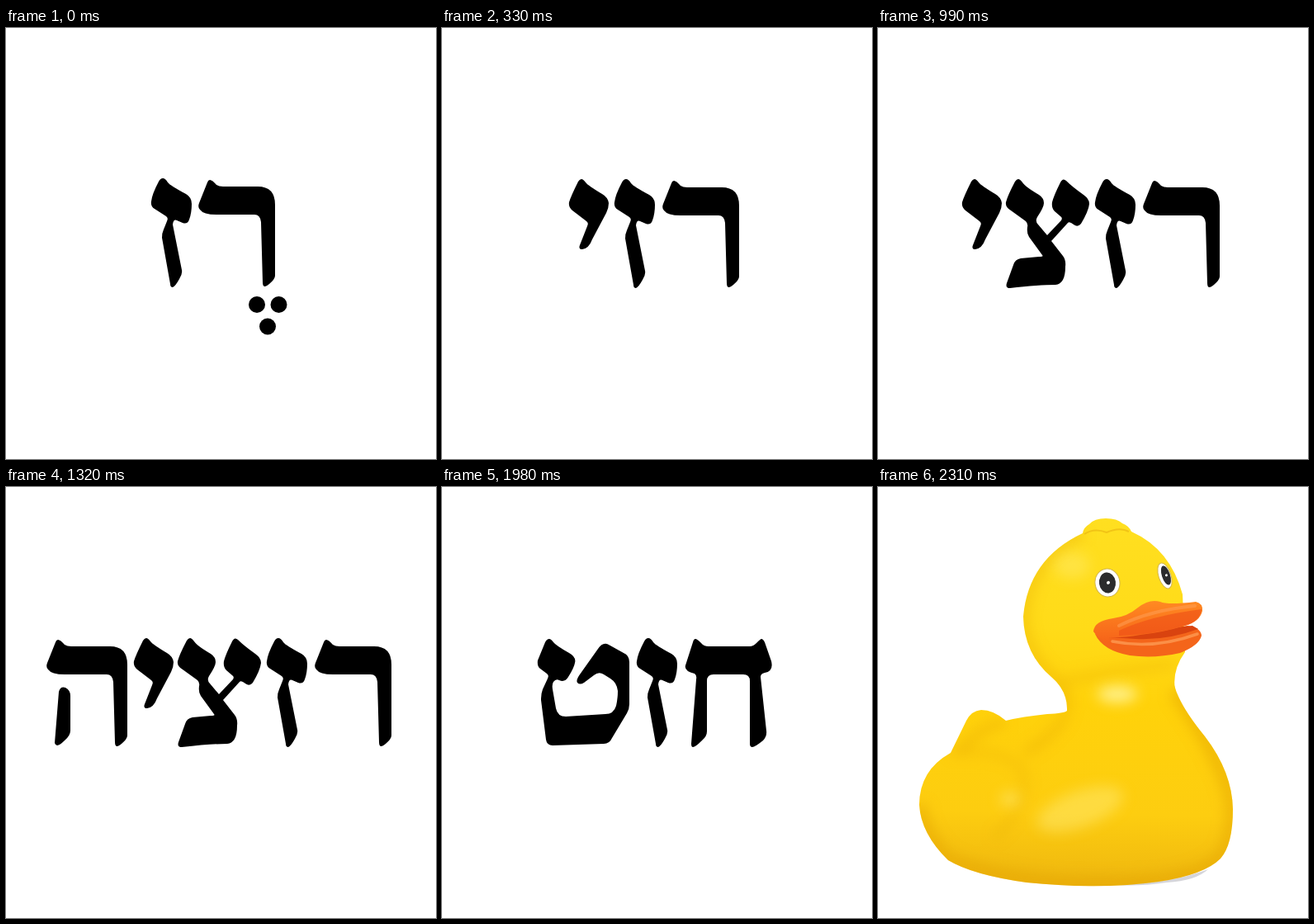
Write an HTML page that moves like this. It is 521 px wide and 522 px high and loops after 2.61 s.

```html
<!DOCTYPE html>
<html lang="he">
<head>
<meta charset="utf-8">
<style>
html, body { margin: 0; width: 100%; height: 100%; overflow: hidden; background: #fff; }
svg { display: block; width: 100%; height: 100%; }
.scene { visibility: hidden; }
.scene.on { visibility: visible; }
</style>
</head>
<body>
<svg id="stage" viewBox="0 0 521 522">
  <defs>
    <linearGradient id="skin" gradientUnits="userSpaceOnUse" x1="275" y1="40" x2="265" y2="485">
      <stop offset="0" stop-color="#ffdf20"/>
      <stop offset=".3" stop-color="#ffdb18"/>
      <stop offset=".5" stop-color="#ffd20a"/>
      <stop offset=".8" stop-color="#fdcd10"/>
      <stop offset="1" stop-color="#eeb60f"/>
    </linearGradient>
    <linearGradient id="beak" x1="0" y1="0" x2="0" y2="1">
      <stop offset="0" stop-color="#ff8a22"/>
      <stop offset="1" stop-color="#f55f18"/>
    </linearGradient>
    <filter id="soft" filterUnits="userSpaceOnUse" x="0" y="0" width="521" height="522"><feGaussianBlur stdDeviation="8"/></filter>
    <clipPath id="hull"><use href="#torso"/><use href="#head"/></clipPath>
  </defs>
  <g id="words"></g>
  <g class="scene">
    <path d="M290 482Q355 480 400 463Q385 477 350 479Q315 484 290 482Z" fill="#d5d5da"/>
    <g fill="url(#skin)">
      <path id="torso" d="M229 271Q226 274 205 275Q175 278 155 283Q140 270 125 270Q113 271 107 283L88 322Q50 343 50 385Q52 420 85 452Q115 470 180 479Q270 488 340 478Q395 470 415 450Q430 433 430 390Q429 345 396 302Q365 264 359 240L230 235Z"/>
      <path id="head" d="M248 56Q249 49 256 45Q262 38 276 38Q290 38 296 44Q304 47 307 54Q354 75 369 130L372 200Q356 222 360 246Q330 290 290 290Q255 290 229 271Q230 247 210 230Q177 202 176 157Q182 87 248 56Z"/>
    </g>
    <g clip-path="url(#hull)">
      <g fill="none" stroke="#e3a108" filter="url(#soft)">
        <path d="M248 56Q182 87 176 157Q177 202 210 230Q230 247 229 271" stroke-width="12" opacity=".35"/>
        <path d="M360 246Q429 345 430 390Q430 433 415 450Q395 470 340 478Q180 490 85 452Q52 420 50 385" stroke-width="18" opacity=".5"/>
        <path d="M88 322Q155 315 176 344Q186 385 140 425" stroke-width="8" opacity=".3"/>
        <path d="M155 284Q125 290 98 320M228 276Q212 303 178 322" stroke-width="9" opacity=".4"/>
        <path d="M222 236Q290 222 360 214" stroke-width="10" opacity=".3"/>
      </g>
      <g fill="#fff08a" filter="url(#soft)">
        <ellipse cx="290" cy="251" rx="24" ry="10"/>
        <ellipse cx="245" cy="390" rx="55" ry="22" transform="rotate(-20 245 390)" opacity=".4"/>
        <ellipse cx="160" cy="378" rx="12" ry="8" opacity=".5"/>
        <ellipse cx="235" cy="95" rx="22" ry="16" opacity=".35"/>
      </g>
    </g>
    <path fill="none" stroke="#e8b212" stroke-width="2" opacity=".6" d="M250 57Q262 49 277 55Q293 48 304 54"/>
    <g transform="translate(278 116) rotate(-8)">
      <ellipse rx="15" ry="17" fill="#fff" stroke="#d3b54a"/>
      <ellipse rx="10" ry="12.500" fill="#2b2b2d"/>
      <circle cx="1" r="2" fill="#fff"/>
    </g>
    <g transform="translate(347.500 107.500) rotate(-18)">
      <ellipse rx="7.500" ry="16" fill="#fff" stroke="#d3b54a"/>
      <ellipse cx="1.500" rx="5" ry="12" fill="#2b2b2d"/>
      <circle cx="2" r="1.500" fill="#fff"/>
    </g>
    <path fill="#f4651a" d="M263 178Q275 180 300 181L375 168Q391 170 392 180Q389 192 366 201Q335 208 305 204Q272 198 263 178Z"/>
    <path fill="#d9430f" d="M280 182Q330 172 381 168L388 172Q350 186 312 184Z"/>
    <path fill="url(#beak)" d="M261 175Q262 162 285 159Q302 157 315 146Q329 135 342 139Q351 143 385 139Q394 141 393 150Q390 163 372 168Q345 176 318 179Q295 183 279 182Q282 190 300 194Q272 191 261 175Z"/>
    <path fill="#ee4f16" opacity=".6" d="M292 174Q330 156 392 148Q390 163 372 168Q335 179 292 180Z"/>
    <g fill="none" stroke="#ffa25a" stroke-linecap="round">
      <path stroke-width="4" opacity=".5" d="M292 168Q330 149 384 144"/>
      <path stroke-width="3.500" opacity=".7" d="M284 187Q335 197 387 178"/>
    </g>
  </g>
</svg>
<script>
// Letter outlines: left edge at x = 0, top line at y = 0.
const glyphs = {
  'ר': 'M14 2Q17 2 22 8Q25 10 30 10H72Q93 10 93 32V118Q93 122 86 128Q78 135 78 126L76 53Q75 44 68 44H22Q6 44 2 38Q-1 35 1 30L11 5Q12 2 14 2Z',
  'ז': 'M14 0Q17 0 20 5Q23 9 42 19Q49 23 49 31Q49 42 46 50Q44 56 38 54L31 51Q27 49 26 56L37 111Q38 116 34 122Q29 131 26 132Q23 132 23 128L13 72Q13 66 15 62L19 52Q21 48 18 46L4 37Q-1 34 0 28Q1 19 9 4Q11 0 14 0Z',
  'י': 'M15 0Q17 0 20 4Q23 8 40 18Q47 22 48 29Q48 35 45 41L28 73Q24 84 16 85Q11 85 13 80L22 57Q24 53 21 51L4 38Q-1 34 0 28Q2 21 11 3Q13 0 15 0Z',
  'ם': 'M14 2Q16 2 21 7Q24 10 29 10H90Q100 10 103 18L112 56Q114 64 113 71L102 111Q100 118 94 119L42 131Q28 135 25 123L14 69Q13 62 15 55Q18 47 19 45Q17 43 13 43Q0 40 1 33Q1 30 3 27L11 5Q12 2 14 2ZM33 44Q25 44 25 52Q26 57 36 90Q39 99 54 97L92 87Q99 84 100 77Q101 60 98 50Q96 44 90 44Z',
  'צ': 'M15 0Q17 0 20 4Q23 9 40 19Q46 23 46 29Q46 34 38 46Q35 51 39 55L50 68L67 50Q69 47 66 45L59 39Q55 35 56 28Q58 20 66 4Q69 -2 73 2Q80 9 94 19Q101 24 101 30Q100 39 91 54Q87 59 82 55Q77 51 75 53L55 75L69 93Q73 98 72 106Q72 127 60 128Q40 128 5 132Q-1 132 1 126L9 104Q11 97 18 96L40 94Q46 94 44 92L28 70Q25 66 26 58Q27 54 24 51L6 38Q-1 34 0 28Q2 20 11 3Q13 0 15 0Z',
  'ה': 'M14 2Q17 2 22 8Q25 10 30 10H77Q98 10 98 32V118Q98 122 91 128Q83 135 83 126L81 53Q80 44 73 44H22Q6 44 2 38Q-1 35 1 30L11 5Q12 2 14 2ZM15 65Q17 58 23 60Q29 63 29 70V112Q29 118 22 124Q12 134 10 127Z',
  'ח': 'M12 1Q14 1 19 6Q22 10 28 10H78Q82 10 86 6Q91 1 92 1Q94 1 96 5L104 28Q107 40 96 42Q91 43 91 47L98 112Q99 119 94 124Q84 132 81 132Q78 132 78 128V52Q78 44 70 44H34Q26 44 26 52V113Q26 119 20 124Q12 132 9 132Q7 132 7 128L13 50Q14 45 11 43Q-2 40 0 33L9 5Q10 1 12 1Z',
  'ו': 'M15 0Q17 0 20 4Q23 9 36 17Q43 22 43 31V112Q42 126 36 131Q30 134 30 127L28 58Q28 53 23 50L6 38Q-1 34 1 27Q3 20 11 3Q13 0 15 0Z',
  'ץ': 'M15 0Q18 0 21 5Q24 9 42 20Q49 25 49 30Q49 34 44 41L31 58Q27 63 27 70L28 100L66 56Q71 51 68 48L60 40Q56 36 57 30Q59 24 73 3Q76 -2 80 3Q86 11 98 19Q104 24 103 30L92 60Q88 68 82 64L77 58Q73 53 69 58L29 122L31 162Q32 170 27 176Q19 185 16 186Q14 186 14 182V78Q14 70 18 65L24 56Q27 52 23 50L5 38Q-1 34 0 27Q2 20 11 3Q13 0 15 0Z',
  'ט': 'M14 1Q16 1 19 5Q22 9 38 18Q47 23 45 30Q44 36 37 47Q33 54 26 51Q22 49 19 53Q17 56 18 62L22 85Q24 95 34 95L82 92Q92 92 95 82Q97 73 97 64Q96 54 88 49L80 44Q74 40 68 45L56 54Q51 57 48 54Q46 51 51 44L73 13Q79 4 86 8L104 18Q111 21 111 29V80Q111 86 108 91L90 121Q87 128 80 128L18 130Q11 130 10 123L4 75Q4 67 6 62L12 49Q14 45 11 43L3 37Q-1 34 0 27L9 5Q11 1 14 1Z'
};

// Each word: text, top line, left edge of every letter.
const words = [
  ['רז', 182, [233, 176]],
  ['רזי', 183, [267, 209, 154]],
  ['רייזם', 183, [354, 299, 243, 186, 67]],
  ['רזצי', 183, [321, 263, 155, 102]],
  ['רזציה', 183, [374, 316, 208, 155, 49]],
  ['רזחוץ', 184, [381, 324, 209, 152, 41]],
  ['חזט', 183, [295, 236, 116]]
];
const segol = [[304, 335], [330.5, 335], [317, 361.5]]
  .map(([x, y]) => `<circle cx="${x}" cy="${y}" r="10"/>`).join('');

document.getElementById('words').innerHTML = words.map(([text, y, xs], i) => {
  const letters = xs.map((x, k) =>
    `<path fill-rule="evenodd" transform="translate(${x} ${y})" d="${glyphs[text[k]]}"/>`);
  return `<g class="scene" role="img" aria-label="${text}">${letters.join('')}${i ? '' : segol}</g>`;
}).join('');

const scenes = [...document.querySelectorAll('.scene')];
const STEP = 330, LOOP = 2610;

function draw() {
  const now = Math.floor(performance.now() % LOOP / STEP);
  scenes.forEach((s, i) => s.classList.toggle('on', i === now));
  requestAnimationFrame(draw);
}
draw();
</script>
</body>
</html>
```
